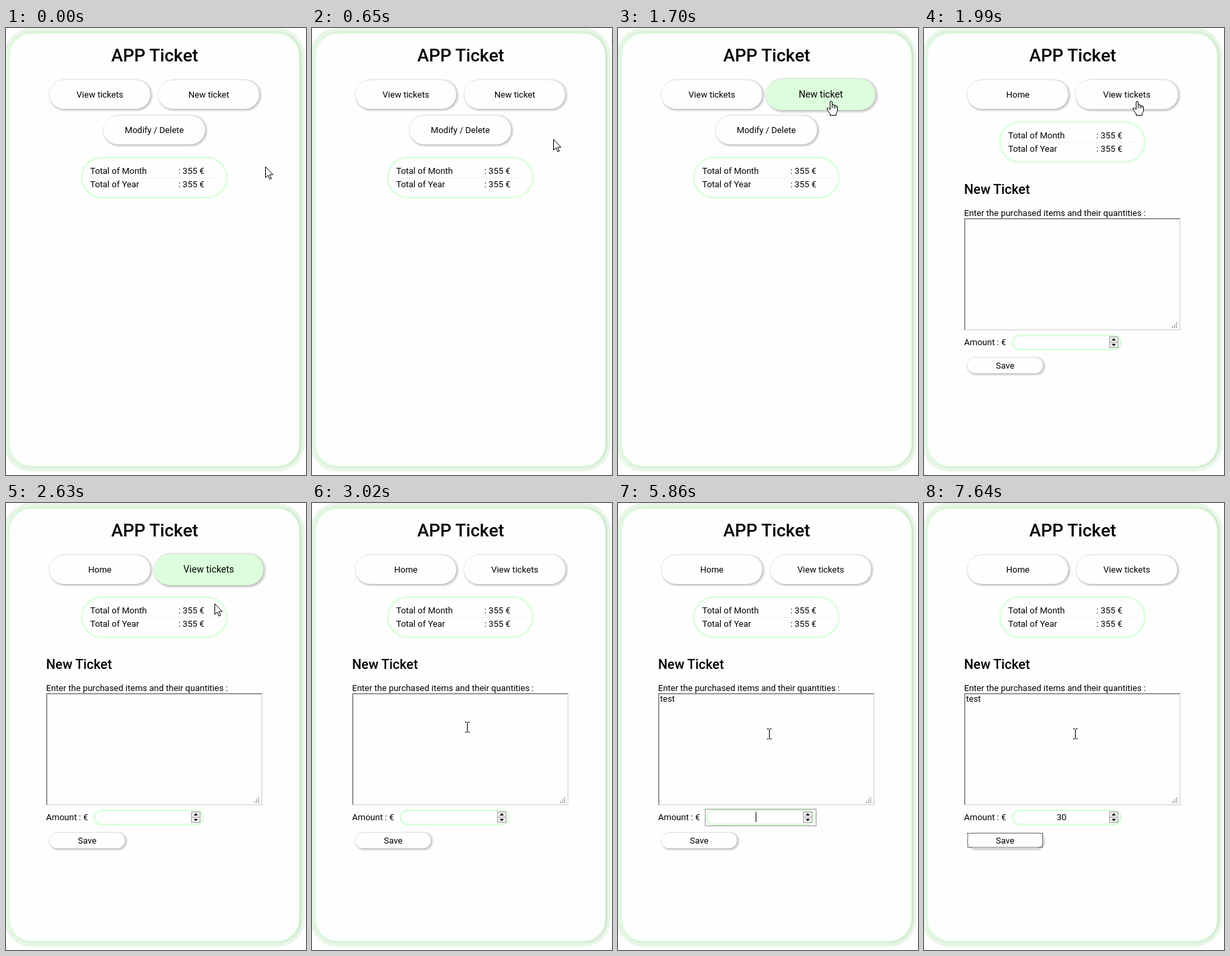
Animation of 449 by 668 pixels, one loop 8000 ms. Source, as an HTML page:

```html
<!DOCTYPE html>
<html lang="en">
<head>
<meta charset="utf-8">
<title>APP Ticket</title>
<style>
  html, body { margin: 0; width: 100%; height: 100%; overflow: hidden; background: #fff; }
  #stage { position: absolute; left: 0; top: 0; width: 449px; height: 668px; overflow: hidden; background: #fff;
    font: 13px/15px Roboto, sans-serif; color: #000; }
  #stage * { position: absolute; box-sizing: border-box; }
  p, h1, h2 { margin: 0; white-space: pre; }
  h1 { font: 500 26.4px/30px Roboto, sans-serif; left: 0; width: 445px; top: 26px; text-align: center; }
  h2 { font: 500 19.8px/23px Roboto, sans-serif; left: 60px; top: 230px; }

  .card { left: 4px; top: 7px; width: 436px; height: 649px; border: 2px solid #dfd; border-radius: 34px;
    background: #fefefe; box-shadow: 1px 0 3px #b9cdb9, 0 0 1px 7px #e8f6e8; }
  .button { top: 78px; width: 151px; height: 43px; line-height: 43px; border-radius: 22px; text-align: center;
    background: #fefefe; box-shadow: 1px 1px 2px #b0b0b0, 1.5px 1px 1px 2.5px #e6e6e6; }
  .totals { left: 112px; width: 220px; height: 63px; border: 3px solid #dfd; border-radius: 32px; }
  .totals i { left: 11px; top: 28px; width: 192px; border-top: 2px dotted #eef0ee; }

  .area { left: 60px; top: 284px; width: 324px; height: 168px; border: 2px solid;
    border-color: #999 #e3e3e3 #e3e3e3 #999; background: #fefefe; }
  .amount { left: 131px; top: 458px; width: 165px; height: 24px; border: 3px solid #dfd; border-radius: 12px; }
  #amountFocus { left: 130px; top: 457px; width: 167px; height: 26px; border: 1px solid #999; }
  #saveFocus { left: 65px; top: 493px; width: 113px; height: 22px; border: 1px dotted #000; }
  #value { left: 156px; top: 462px; width: 100px; text-align: center; }
  #caret { width: 1px; background: #000; }
  svg { left: 0; top: 0; overflow: visible; }
</style>
</head>
<body>
<div id="stage">
  <div class="card"></div>
  <h1>APP Ticket</h1>

  <div id="home">
    <div class="button" style="left:65px">View tickets</div>
    <div class="button hot" style="left:228px">New ticket</div>
    <div class="button" style="left:146px;top:131px;width:152px">Modify / Delete</div>
  </div>

  <div id="form">
    <div class="button" style="left:65px">Home</div>
    <div class="button hot" style="left:228px">View tickets</div>
    <h2>New Ticket</h2>
    <p style="left:60px;top:269px">Enter the purchased items and their quantities :</p>
    <div class="area"></div>
    <p id="items" style="left:63px;top:285px"></p>
    <p style="left:60px;top:462px">Amount : €</p>
    <div class="amount"></div>
    <div id="amountFocus"></div>
    <p id="value"></p>
    <div class="button" style="left:65px;top:493px;width:113px;height:23px;line-height:23px">Save</div>
    <div id="saveFocus"></div>
    <svg width="449" height="668">
      <path d="M277.5 461.5h13v8h-13zM277.5 469.5h13v8h-13z" fill="#ececec" stroke="#a4a4a4"/>
      <path d="M281 467h6l-3-3.500zM281 472h6l-3 3.500z"/>
      <path d="M377 441h2M374 444h2m1 0h2M371 447h2m1 0h2m1 0h2" stroke="#a8a8a8" stroke-width="2"/>
    </svg>
    <div id="caret"></div>
  </div>

  <div class="totals" id="totals">
    <p style="left:11px;top:11px">Total of Month</p><p style="left:143px;top:11px">: 355 €</p>
    <i></i>
    <p style="left:11px;top:31px">Total of Year</p><p style="left:143px;top:31px">: 355 €</p>
  </div>

  <svg width="449" height="668">
    <g id="cursor" fill="#fff" stroke="#000" stroke-linejoin="round">
      <path id="arrow" d="M.5.5v16l3.700-3.500 2.600 6 2.400-1-2.600-5.800h5z"/>
      <path id="hand" d="M-1.500 13V2Q-1.500.5 0 .5T1.500 2V6.500Q1.500 5.500 3 5.500T4.500 7Q4.500 6.500 5.700 6.500T7 8Q7 7.500 8.200 7.500T9.500 9V14Q9.500 16 7.500 18.500V21.500H-1.500V19Q-4 16.500 -6 12.500Q-6.800 10.500 -5 10.500Q-3.500 10.500 -1.500 13M1.500 6.500V11M4.500 7V11M7 8V11"/>
      <path id="beam" fill="none" d="M-3 -7.500H-.5L.5 -6.500 1.500 -7.500H4M.5 -6.500V6.500M-3 7.500H-.5L.5 6.500 1.500 7.500H4"/>
    </g>
  </svg>
</div>
<script>
const LOOP = 8000, FORM_AT = 1990;
const byId = id => document.getElementById(id);
const show = (el, on) => { el.style.visibility = on ? 'visible' : 'hidden'; };

// time, x, y, shape
const pointer = [
  [0, 388, 207, 'arrow'], [260, 386, 203, 'arrow'], [390, 379, 191, 'arrow'], [520, 370, 178, 'arrow'],
  [650, 361, 166, 'arrow'], [790, 334, 120, 'hand'], [920, 323, 112, 'hand'], [1050, 320, 110, 'hand'],
  [1180, 319, 109, 'hand'], [2630, 312, 150, 'arrow'], [2760, 287, 215, 'arrow'],
  [2890, 254, 290, 'beam'], [3020, 232, 335, 'beam'], [3150, 226, 345, 'beam']
];
// time, hover strength
const hover = [
  [0, 0], [790, .2], [920, .65], [1050, 1], [FORM_AT, .2], [2110, .6], [2230, .9], [2360, 1],
  [2760, .75], [2890, .35], [3020, .08], [3150, 0]
];
// time, items, amount, caret x (0 = off), focus
const entry = [
  [0, '', '', 0, ''], [3150, '', '', 63, 'items'], [3710, '', '', 0, 'items'],
  [4250, 't', '', 67, 'items'], [4380, 'te', '', 74, 'items'], [4510, 'tes', '', 81, 'items'],
  [4780, 'test', '', 0, 'items'], [5310, 'test', '', 85, 'items'], [5860, 'test', '', 206, 'amount'],
  [6270, 'test', '3', 209, 'amount'], [6400, 'test', '30', 213, 'amount'],
  [6970, 'test', '30', 0, 'amount'], [7490, 'test', '30', 213, 'amount'], [7640, 'test', '30', 0, 'save']
];
const at = (table, t) => table.findLast(row => row[0] <= t);
const mix = (a, b, k) => a + (b - a) * k;

function draw(t) {
  const onForm = t >= FORM_AT;
  byId('home').style.display = onForm ? 'none' : '';
  byId('form').style.display = onForm ? '' : 'none';
  byId('totals').style.top = (onForm ? 139 : 192) + 'px';

  const [, x, y, shape] = at(pointer, t);
  byId('cursor').setAttribute('transform', `translate(${x} ${y})`);
  for (const id of ['arrow', 'hand', 'beam']) show(byId(id), id === shape);

  // The size leads, the tint follows.
  const k = at(hover, t)[1], tint = Math.round(mix(254, 221, k * k));
  for (const el of document.querySelectorAll('.hot')) {
    el.style.transform = k ? `scale(${1 + .085 * k})` : '';
    el.style.background = `rgb(${tint}, 254, ${tint})`;
  }

  const [, items, amount, caretX, focus] = at(entry, t);
  byId('items').textContent = items;
  byId('value').textContent = amount;
  const caret = byId('caret').style, inAmount = focus === 'amount';
  caret.left = caretX + 'px';
  caret.top = (inAmount ? 462 : 286) + 'px';
  caret.height = (inAmount ? 15 : 14) + 'px';
  show(byId('caret'), caretX > 0);
  show(byId('amountFocus'), inAmount);
  show(byId('saveFocus'), focus === 'save');
}

const start = performance.now();
function tick() {
  draw((performance.now() - start) % LOOP);
  requestAnimationFrame(tick);
}
tick();
</script>
</body>
</html>
```
